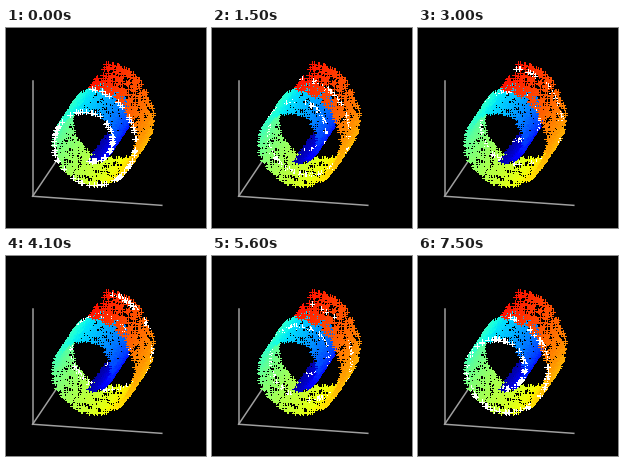
A matplotlib script that plays this animation: 200 px wide and 200 px high, repeating every 7.6 s.

```python
import numpy as np
import matplotlib.pyplot as plt
from matplotlib.animation import FuncAnimation

SIZE, DPI = 200, 72  # at 72 dpi one point is one pixel
FRAMES, INTERVAL = 76, 100
POINTS, DEPTH, HALF_BAND = 2000, 21.0, 0.55


def project(x, depth, z):
    """Oblique view of the roll in stage pixels, y pointing down."""
    return (82 + 3.69 * x + 0.86 * depth,
            114.7 + 0.26 * x - 1.28 * depth - 3.83 * z)


rng = np.random.default_rng(4)
u = rng.random(POINTS)
y = DEPTH * rng.random(POINTS)
t = 1.5 * np.pi * (1 + 2 * u)
x, z = t * np.cos(t), t * np.sin(t)

# Paint from far to near.
order = np.argsort(0.23 * x - y + 0.35 * z)
u, x, y, z = u[order], x[order], y[order], z[order]
px, py = (np.floor(v) + 0.5 for v in project(x, y, z))
base = plt.cm.jet(0.03 + 0.86 * u)

fig = plt.figure(figsize=(SIZE / DPI, SIZE / DPI), dpi=DPI, facecolor="black")
ax = fig.add_axes([0, 0, 1, 1])
ax.set_xlim(0, SIZE)
ax.set_ylim(SIZE, 0)
ax.axis("off")

corner = (-15, 0, -15)
for end in ((20, 0, -15), (-15, 32, -15), (-15, 0, 15)):
    (x0, y0), (x1, y1) = project(*corner), project(*end)
    ax.plot((x0, x1), (y0, y1), color="#a0a0a0", lw=1.5, zorder=1)
cloud = ax.scatter(px, py, s=25, marker="+", c=base, linewidths=1,
                   antialiased=False, zorder=2)


def draw(i):
    phase = 1 - abs(1 - 2 * i / FRAMES)
    center = HALF_BAND + (DEPTH - 2 * HALF_BAND) * phase
    colors = base.copy()
    colors[np.abs(y - center) < HALF_BAND] = 1
    cloud.set_color(colors)
    return (cloud,)


anim = FuncAnimation(fig, draw, frames=FRAMES, interval=INTERVAL,
                     repeat=True, repeat_delay=0, blit=False)
plt.show()
```
